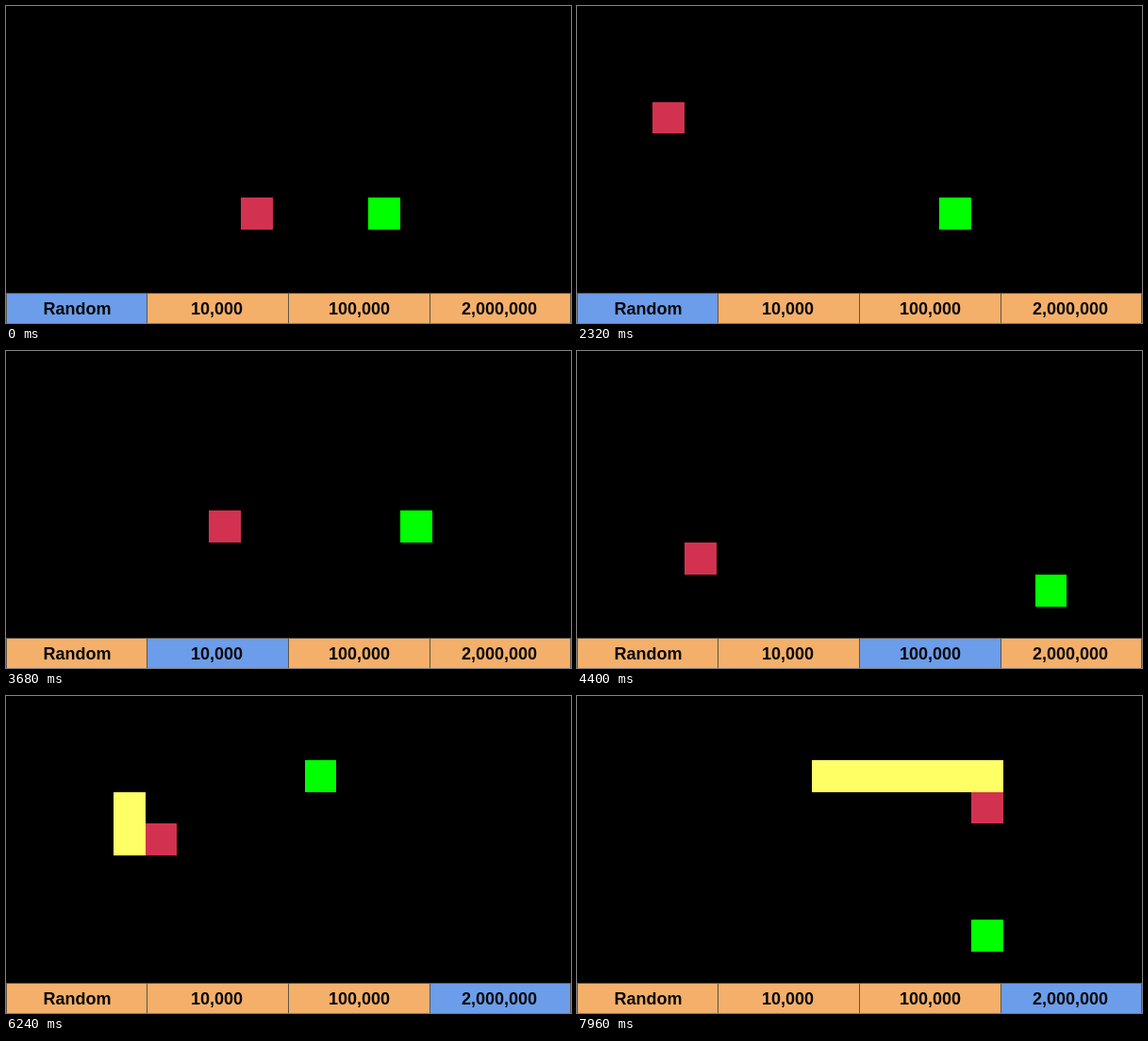
An HTML page with a canvas for the animation above (8 s loop, 599 px wide and 336 px high).

```html
<!DOCTYPE html>
<html lang="en">
<head>
<meta charset="utf-8">
<title>Snake training</title>
<style>
  html, body { margin: 0; width: 100%; height: 100%; overflow: hidden; background: #000; }
  canvas, svg { position: absolute; left: 0; top: 0; width: 599px; height: 336px; }
  text { font: bold 18px "Liberation Sans", Arial, sans-serif; text-anchor: middle; fill: #080808; }
  .cell { fill: #f4b06a; }
  .cell.active { fill: #6c9dea; }
  .rule { stroke: #5d5548; fill: none; }
</style>
</head>
<body>
<canvas width="599" height="336"></canvas>
<svg viewBox="0 0 599 336">
  <rect class="cell" x="0" y="304" width="150" height="32"/>
  <rect class="cell" x="150" y="304" width="149" height="32"/>
  <rect class="cell" x="299" y="304" width="150" height="32"/>
  <rect class="cell" x="449" y="304" width="150" height="32"/>
  <path class="rule" d="M0 304.5H599M.5 304V336M149.5 304V336M299.5 304V336M449.5 304V336M598.5 304V336"/>
  <text x="75.5" y="327">Random</text>
  <text x="223.5" y="327">10,000</text>
  <text x="374.5" y="327">100,000</text>
  <text x="523" y="327">2,000,000</text>
</svg>
<script>
const TICK = 40, TICKS = 200, CELL = 33.8, LEFT = 12.4, TOP = 0.2;
const HEAD = '#d23250', BODY = '#ffff66', FOOD = '#00ff00';
const DIRS = { L: [-1, 0], R: [1, 0], U: [0, -1], D: [0, 1] };

// Each run: first tick, start cell, turns with their lengths, food in order.
const runs = [
  { from: 0, start: [7, 6], food: [[11, 6]],
    moves: 'LURDLLUURDLUR LDLUUDRLDRULL DRULDDRRUL LURDLUURDL LDRUULDRLU UR' },
  { from: 61, start: [7, 5], food: [[12, 5]],
    moves: 'L3 D2 R5 U L6 D2 R5 U3 L2 L6 D2 R4' },
  { from: 105, start: [7, 5], food: [[14, 7], [10, 1], [2, 6]],
    moves: 'L4 D2 R11 U3 L4 U3 L8' },
  { from: 143, start: [7, 6], food: [[8, 4], [3, 3], [9, 2], [14, 6], [6, 3], [12, 2], [12, 7]],
    moves: 'R U4 L5 D2 R6 U2 R4 U2 R D7 L3 U4 L5 U R6 D' }
];

// The game advances 24 times a second, shown at 25.
const stepAt = tick => tick - Math.floor((tick + 13) / 25);

function simulate({ start, moves, food }) {
  let snake = [start], eaten = 0;
  const states = [{ snake, food: food[0] }];
  for (const [, dir, count] of moves.matchAll(/([LRUD])(\d*)/g)) {
    for (let i = 0; i < (count || 1); i++) {
      const head = snake[0].map((v, axis) => v + DIRS[dir][axis]);
      const target = food[eaten];
      const ate = head[0] === target[0] && head[1] === target[1];
      if (ate && eaten < food.length - 1) eaten++;
      snake = [head, ...(ate ? snake : snake.slice(0, -1))];
      states.push({ snake, food: food[eaten] });
    }
  }
  return states;
}

for (const run of runs) run.states = simulate(run);

const ctx = document.querySelector('canvas').getContext('2d');
const cells = document.querySelectorAll('.cell');

function drawCell([col, row], color) {
  const x = Math.round(LEFT + col * CELL), y = Math.round(TOP + row * CELL);
  const right = Math.round(LEFT + (col + 1) * CELL), bottom = Math.round(TOP + (row + 1) * CELL);
  ctx.fillStyle = color;
  ctx.fillRect(x, y, right - x, bottom - y);
}

function draw(tick) {
  const active = runs.findLastIndex(run => run.from <= tick);
  const { from, states } = runs[active];
  const { snake, food } = states[Math.min(stepAt(tick) - stepAt(from), states.length - 1)];
  ctx.fillStyle = '#000';
  ctx.fillRect(0, 0, 599, 336);
  drawCell(food, FOOD);
  snake.slice(1).forEach(part => drawCell(part, BODY));
  drawCell(snake[0], HEAD);
  cells.forEach((cell, i) => cell.classList.toggle('active', i === active));
}

const begin = performance.now();
function loop() {
  draw(Math.floor((performance.now() - begin) / TICK) % TICKS);
  requestAnimationFrame(loop);
}
loop();
</script>
</body>
</html>
```
